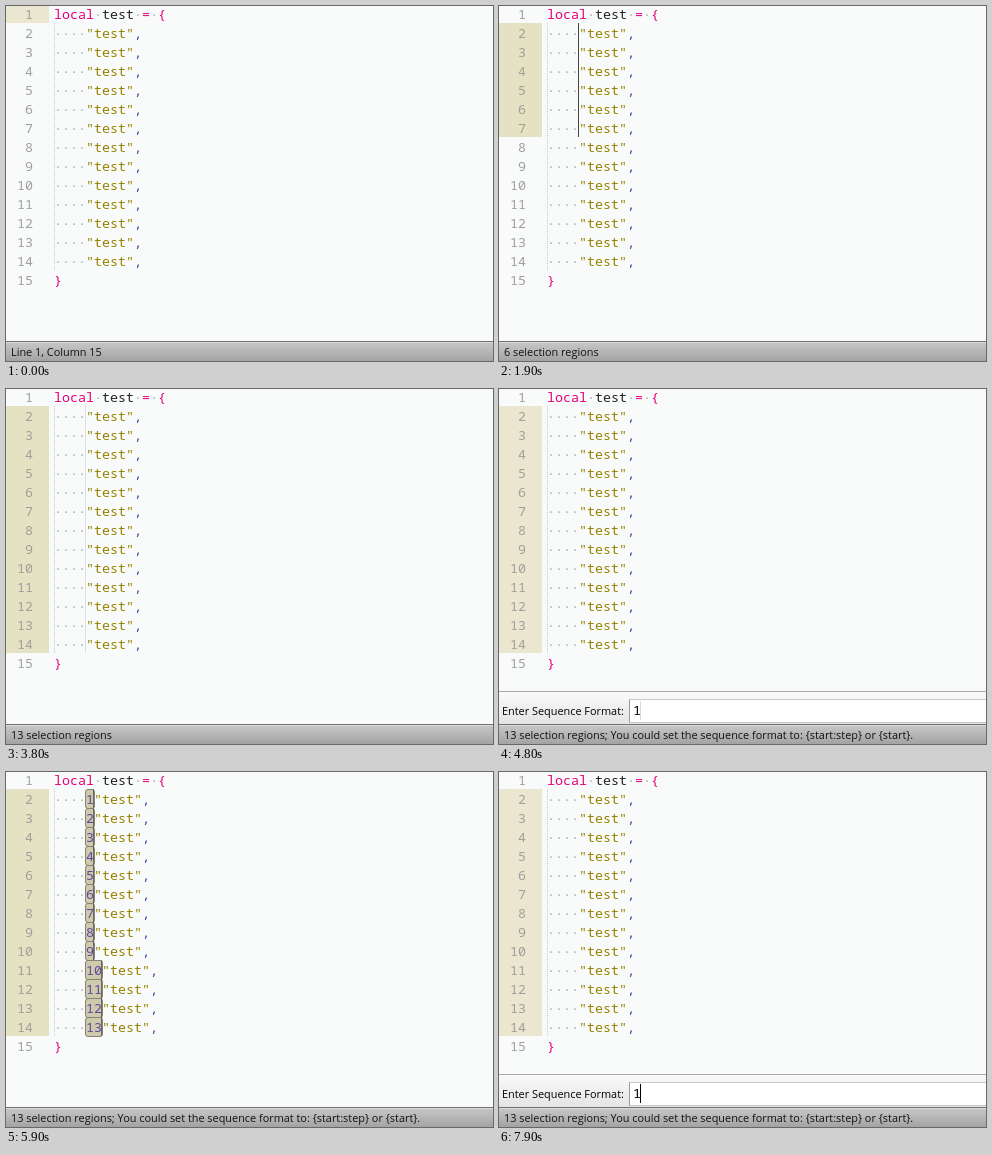
Write an HTML page that moves like this. It is 487 px wide and 355 px high and loops after 8 s.

```html
<!DOCTYPE html>
<html lang="en">
<head>
<meta charset="utf-8">
<title>Numbered selections</title>
<style>
  html, body { margin: 0; width: 100%; height: 100%; overflow: hidden; background: #f9fbfa; }
  #stage { position: relative; width: 487px; height: 355px; overflow: hidden; }
  #stage div { position: absolute; white-space: pre; box-sizing: border-box; }
  .row, #value { font: 13.333px/21px "Noto Sans Mono", monospace; }
  .row { left: 0; width: 487px; height: 19px; }
  .gutter { left: 0; width: 43px; height: 19px; padding-right: 16px; text-align: right; color: #9fa09b; }
  .code { left: 48px; color: #222; }
  .key { color: #e6007c; }
  .str { color: #968200; }
  .comma { color: #4f40a0; }
  .dot { color: #a4adad; }
  .num { color: #6048a0; }
  .sel { left: 79px; height: 20px; top: 0; border: 1px solid #858371; border-radius: 3px; background: #cecaab; }
  .caret { width: 1px; height: 19px; background: #444; }
  #guide { left: 48px; top: 17px; width: 1px; height: 247px;
    background: repeating-linear-gradient(#c6cccb 0 1px, transparent 1px 2px); }
  .ui { font: 10.9px/15px "Open Sans", sans-serif; color: #111; }
  #panel { left: 0; top: 302px; width: 487px; height: 33px; border-top: 1px solid #a9a9a9;
    background: linear-gradient(#fafafa, #e4e4e4); }
  #label { left: 3px; top: 11px; color: #000; }
  #field { left: 130px; top: 7px; width: 360px; height: 24px; background: #fff;
    border: 1px solid #c8c8c8; border-left-color: #999; }
  #value { left: 3px; top: 0; color: #000; }
  #field .caret { left: 10px; top: 1px; background: #000; }
  #status { left: 0; top: 335px; width: 487px; height: 20px; padding: 2px 5px; border-top: 1px solid #717171;
    background: linear-gradient(#dadada 0 1px, #c6c6c6 1px, #a3a3a3); }
</style>
</head>
<body>
<div id="stage">
  <div id="guide"></div>
  <div id="panel">
    <div id="label" class="ui">Enter Sequence Format:</div>
    <div id="field"><div id="value">1</div><div class="caret"></div></div>
  </div>
  <div id="status" class="ui"></div>
</div>
<script>
const LOOP = 8000, TICK = 100, LINES = 15;
const HINT = "; You could set the sequence format to: {start:step} or {start}.";
const stage = document.getElementById("stage");
const panel = document.getElementById("panel");
const statusBar = document.getElementById("status");
const fieldCaret = panel.querySelector(".caret");

// Caret opacity, each value held until the next time
const blink = [
  [0, 0], [800, 1], [1300, .7], [1400, .3], [1500, 0],
  [1700, 1], [3200, .7], [3300, .3], [3400, 0], [3800, .15],
  [3900, 1], [4300, .4], [4400, 0], [4800, .15],
  [4900, 1], [5200, .7], [5300, .3], [5400, 0], [5800, .3], [5900, .7],
  [6100, 1], [6400, .7], [6500, .3], [6600, 0],
  [6800, 1], [7200, .7], [7300, .3], [7400, 0], [7700, .3], [7800, .7], [7900, 1]
];

const span = (kind, text) => `<span class="${kind}">${text}</span>`;
const dots = count => span("dot", "·".repeat(count));

function lineMarkup(line) {
  if (line === 1) {
    return span("key", "local") + dots(1) + "test" + dots(1) + span("key", "=") + dots(1) + span("key", "{");
  }
  if (line === LINES) return span("key", "}");
  return dots(4) + span("num", "") + span("str", '"test"') + span("comma", ",");
}

function addDiv(parent, kind) {
  const element = document.createElement("div");
  element.className = kind;
  return parent.appendChild(element);
}

const rows = Array.from({ length: LINES }, (_, index) => {
  const line = index + 1;
  const row = addDiv(stage, "row");
  row.style.top = 19 * index - 2 + "px";
  const gutter = addDiv(row, "gutter");
  gutter.textContent = line;
  const sel = addDiv(row, "sel");
  const code = addDiv(row, "code");
  code.innerHTML = lineMarkup(line);
  return { line, gutter, sel, num: code.querySelector(".num"), caret: addDiv(row, "caret") };
});

function regionCount(t) {
  if (t < 800) return 0;
  if (t < 1700) return 1;
  if (t < 2600) return Math.min(12, Math.floor(3 + 1.5 * (t - 1700) / TICK));
  return 13;
}

function statusText(t, regions) {
  if (regions === 0) return "Line 1, Column 15";
  if (regions === 1) return "Line 2, Column 5";
  return regions + " selection regions" + (t < 3900 ? "" : HINT);
}

function render(t) {
  const regions = regionCount(t);
  const panelOpen = (t >= 3900 && t < 4900) || t >= 6800;
  const numbered = t >= 4900 && t < 6100;
  const alpha = blink.findLast(([start]) => start <= t)[1];
  const activeColor = regions < 2 || panelOpen ? "#ebe6cf" : "#e5e1c3";

  for (const { line, gutter, sel, num, caret } of rows) {
    const selected = line > 1 && line <= regions + 1;
    const active = selected || (line === 1 && regions === 0);
    const digits = numbered && selected ? String(line - 1) : "";
    gutter.style.background = active ? activeColor : "none";
    if (num) num.textContent = digits;
    sel.style.display = digits ? "block" : "none";
    sel.style.width = 8 * digits.length + 2 + "px";
    caret.style.left = 79 + 8 * digits.length + "px";
    caret.style.opacity = selected && !panelOpen ? alpha : 0;
  }
  panel.style.display = panelOpen ? "block" : "none";
  fieldCaret.style.opacity = alpha;
  statusBar.textContent = statusText(t, regions);
}

const started = performance.now();
function frame() {
  const elapsed = (performance.now() - started) % LOOP;
  render(Math.floor(elapsed / TICK) * TICK);
  requestAnimationFrame(frame);
}
frame();
</script>
</body>
</html>
```
